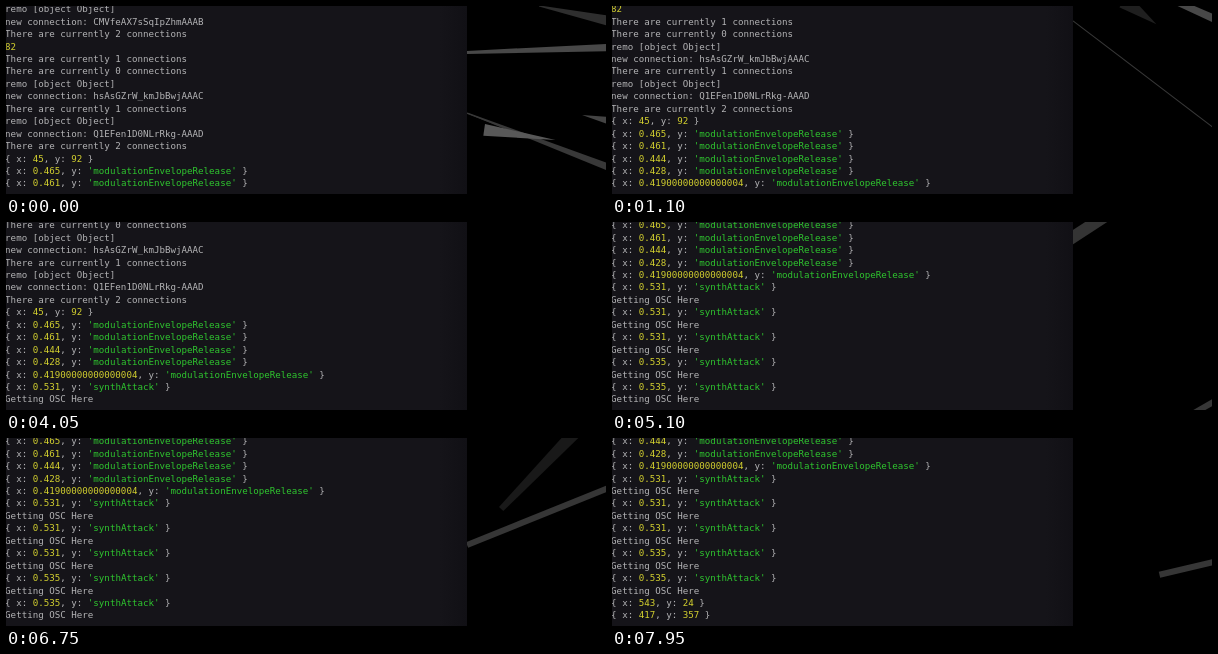
Animation of 600x188 px, one loop 8 s. Source, as an HTML page:

```html
<!DOCTYPE html>
<html lang="en">
<head>
<meta charset="utf-8">
<style>
  html, body { margin: 0; width: 100%; height: 100%; overflow: hidden; background: #000; }
  svg { display: block; width: 600px; height: 188px; }
  text { font: 9.16px "DejaVu Sans Mono", monospace; fill: #b4b4b6; white-space: pre; }
  .num { fill: #d3d02f; }
  .str { fill: #2fc62f; }
</style>
</head>
<body>
<svg viewBox="0 0 600 188">
  <defs>
    <linearGradient id="pane">
      <stop offset=".94" stop-color="#151419"/>
      <stop offset="1" stop-color="#111015"/>
    </linearGradient>
  </defs>
  <rect width="600" height="188" fill="#000"/>
  <g id="scene"></g>
  <rect width="461" height="188" fill="url(#pane)"/>
  <g id="log"></g>
</svg>
<script>
const NS = 'http://www.w3.org/2000/svg';
const LOOP = 8000, PITCH = 12.45, BASE = 180.5;
const scene = document.getElementById('scene');
const log = document.getElementById('log');

function add(parent, tag, attrs) {
  const el = document.createElementNS(NS, tag);
  for (const k in attrs) el.setAttribute(k, attrs[k]);
  return parent.appendChild(el);
}

// Terminal output: each row appears at its own time
const rows = [];
function print(time, ...lines) {
  for (const line of lines) {
    const el = add(log, 'text', { x: -0.9, y: rows.length * PITCH });
    el.innerHTML = line.replace(/^\d+$|(?<=: )[\d.]+(?=,| })|'.*'/g,
      s => `<tspan class="${s[0] === "'" ? 'str' : 'num'}">${s}</tspan>`);
    rows.push({ time, el });
  }
}

const user = 'remo [object Object]';
const joined = id => 'new connection: ' + id;
const count = n => `There are currently ${n} connections`;
const pair = (x, y) => `{ x: ${x}, y: ${y} }`;
const release = x => pair(x, "'modulationEnvelopeRelease'");
const attack = (time, x) => print(time, pair(x, "'synthAttack'"), 'Getting OSC Here');

print(0,
  user, joined('CMVfeAX7sSqIpZhmAAAB'), count(2), '82', count(1), count(0),
  user, joined('hsAsGZrW_kmJbBwjAAAC'), count(1),
  user, joined('Q1EFen1D0NLrRkg-AAAD'), count(2),
  pair(45, 92), release(0.465), release(0.461));
['0.444', '0.428', '0.41900000000000004'].forEach((x, i) => print(300 + 200 * i, release(x)));
attack(3000, 0.531);
[0.531, 0.531, 0.535, 0.535].forEach((x, i) => attack(4150 + 230 * i, x));
print(7200, pair(543, 24));
print(7400, pair(417, 357));

// Tapered bars, seen from a drifting camera.
// Each pose places the bar's near end: [time, x, y, degrees]
const bars = [];
function bar(fill, length, near, far, ...poses) {
  const d = `M0 ${-near / 2}L${length} ${-far / 2}V${far / 2}L0 ${near / 2}Z`;
  bars.push({ poses, el: add(scene, 'path', { d, fill }) });
}

bar('#2e2e2e', 70, 1, 10, [0, 533, 0, 12], [600, 560, -60, 18]);
bar('#484848', 160, 3, 8, [0, 461, 46.5, -2], [1100, 461, -50, 24], [1600, 461, -160, 30]);
bar('#383838', 230, 1, 1, [0, 455, 105, 21], [1100, 461, 15, 37.3], [1700, 461, -120, 42]);
bar('#383838', 200, 1, 9, [0, 461, 107, 21], [600, 600, 60, 28]);
bar('#585858', 72, 12, 0, [0, 478, 124, 8], [800, 600, 70, 20]);
bar('#444', 30, 0, 8, [0, 576, 109, 12], [600, 602, 60, 12]);
bar('#1f1f1f', 40, 16, 0, [600, 490, 50, 25], [1100, 512, -5, 36], [1500, 540, -80, 42]);
bar('#555', 28, 13, 4, [1800, 612, 130, 65], [2300, 590, 166, 72], [2700, 575, 200, 78]);
bar('#343434', 120, 12, 12, [4350, 400, -40, -28], [5100, 455, 19, -33], [5700, 340, 80, -36]);
bar('#191919', 130, 6, 14, [5300, 430, 20, -38], [6750, 495, 71, -46], [7500, 602, 50, -50]);
bar('#363636', 200, 6, 6,
  [4600, 461, 310, -31], [5100, 461, 261, -30], [6750, 461, 107, -22], [LOOP, 551, 138, -13]);

function place(poses, t) {
  const i = poses.findIndex(p => p[0] > t);
  if (i < 1) return null;
  const a = poses[i - 1], b = poses[i], u = (t - a[0]) / (b[0] - a[0]);
  return a.map((v, n) => v + (b[n] - v) * u);
}

function show(el, on) {
  el.style.display = on ? '' : 'none';
}

function draw(t) {
  const shown = rows.filter(r => r.time <= t).length;
  log.setAttribute('transform', `translate(0 ${BASE - (shown - 1) * PITCH})`);
  rows.forEach((r, i) => show(r.el, i < shown));
  for (const { el, poses } of bars) {
    const p = place(poses, t);
    show(el, p);
    if (p) el.setAttribute('transform', `translate(${p[1]} ${p[2]}) rotate(${p[3]})`);
  }
}

const start = performance.now();
function tick() {
  draw((performance.now() - start) % LOOP);
  requestAnimationFrame(tick);
}
draw(0);
requestAnimationFrame(tick);
</script>
</body>
</html>
```
